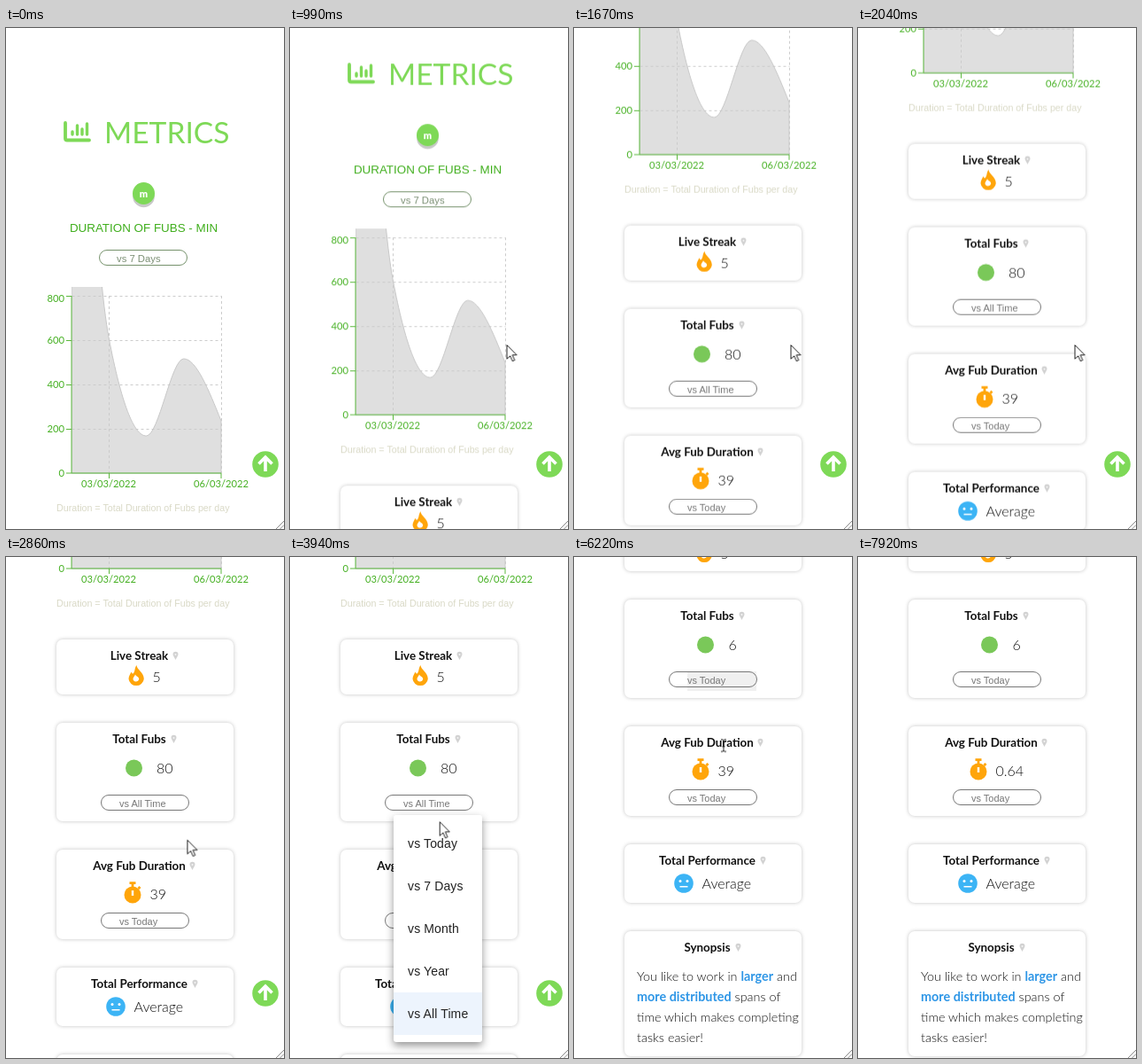
Recreate the animation shown at these times as an HTML page. Size 314 by 565 pixels, loop 8000 ms.

```html
<!DOCTYPE html>
<html lang="en">
<head>
<meta charset="utf-8">
<title>Metrics</title>
<style>
html, body { margin: 0; width: 100%; height: 100%; overflow: hidden; background: #fff; }
svg { display: block; width: 314px; height: 565px; }
text { font-family: Lato, sans-serif; font-weight: 300; fill: #111; white-space: pre; }
.title { font-size: 13.4px; font-weight: 700; text-anchor: middle; }
.value { font-size: 16px; }
.body { font-size: 14.4px; }
.link { font-weight: 700; fill: #2e96e6; }
.arial { font-family: "Liberation Sans", Arial, sans-serif; font-weight: 400; }
.pick { font-size: 11px; fill: #777; }
.option { font-size: 14px; letter-spacing: .13px; fill: #222; }
.axis text { font-size: 11.2px; font-weight: 400; fill: #45b022; }
.card { fill: #fff; filter: drop-shadow(0 0 2px rgba(0,0,0,.24)); }
.pill { fill: none; stroke: #777; }
.line { fill: none; stroke-linecap: round; stroke-linejoin: round; }
#menu { transform-origin: 167px 291px; }
#sheet { filter: drop-shadow(0 4px 5px rgba(0,0,0,.42)); }
</style>
</head>
<body>
<svg viewBox="0 0 314 565">
  <defs>
    <clipPath id="plot"><rect x="74" y="292" width="170" height="211"/></clipPath>
    <g id="pin">
      <path d="M0 4.5C-1 2-3-.2-3-1.7a3 3 0 0 1 6 0C3-.2 1 2 0 4.5Z" fill="#d2d2d2"/>
      <circle cy="-1.6" r="1" fill="#f4f4f4"/>
    </g>
    <g id="watch">
      <circle r="9.5" cy="1" fill="#ffa50a"/>
      <path d="M-3.5-12.3h7M0-12v4M6.5-8l2 2" stroke="#ffa50a" stroke-width="2.8" fill="none"/>
      <path d="M0-4v6" stroke="#fff" stroke-width="2.4"/>
    </g>
  </defs>

  <g id="page">
    <g stroke="#7ed957" stroke-width="3.8" class="line">
      <path d="M67 107v17.500q0 2 2 2h25"/>
      <path d="M75 117v3M80.500 110v10M86 114v6M91.500 108v12" stroke-width="3.4"/>
    </g>
    <text x="111" y="129.500" style="font-size:33.6px;font-weight:400;fill:#7ed957">METRICS</text>
    <circle cx="155.500" cy="189.800" r="12.400" fill="#c9c9c9"/>
    <circle cx="155.500" cy="186.500" r="12.500" fill="#7ed957"/>
    <text x="155.500" y="191" text-anchor="middle" style="font-size:11px;font-weight:900;fill:#fff">m</text>
    <text class="arial" x="155.500" y="230" text-anchor="middle" style="font-size:13.4px;fill:#3fae1c">DURATION OF FUBS - MIN</text>
    <rect class="pill" x="105.500" y="250.500" width="99" height="17" rx="8.500" style="stroke:#76926c"/>
    <text class="arial" x="125" y="264" style="font-size:11.3px;fill:#7b8f74">vs 7 Days</text>

    <path d="M74.500 302.500H243.500M74.500 352.500H243.500M74.500 402.500H243.500M74.500 452.500H243.500M116.500 302V502M243.500 302V502"
      stroke="#ccc" stroke-dasharray="3 3" fill="none"/>
    <path clip-path="url(#plot)" fill="#ccc" fill-opacity=".62" stroke="#c8c8c8"
      d="M74 502V-240C88.100 18 102.200 277 116.250 350C130.300 423 144.400 460 158.500 460C172.600 460 186.700 373 200.750 373C214.800 373 228.900 408 243 443V502Z"/>
    <g class="axis">
      <path d="M74 302V502H243M68 302.500h6M68 352.500h6M68 402.500h6M68 452.500h6M68 502h6M116.500 502v6M243 502v6" fill="none" stroke="#5bb83c"/>
      <g text-anchor="end">
        <text x="66" y="309">800</text><text x="66" y="356">600</text><text x="66" y="406">400</text>
        <text x="66" y="456">200</text><text x="66" y="506">0</text>
      </g>
      <g text-anchor="middle"><text x="116" y="518">03/03/2022</text><text x="243" y="518">06/03/2022</text></g>
    </g>
    <text class="arial" x="57" y="545" style="font-size:10.7px;fill:#d9d9c6">Duration = Total Duration of Fubs per day</text>

    <g id="cards"></g>

    <g transform="translate(147 623)">
      <path d="M.5-12C1-6.500 8.800-4 8.800 3.500A8.700 8.500 0 0 1-8.500 3.500C-8.500 0-6.500-2-5.500-4.500C-5-3-4.500-2.500-3.500-2.500C-1-4.500-2-9 .500-12Z" fill="#ffa50a"/>
      <path d="M-1-1.500C0 1 3.500 1 3.200 4A3.400 3.200 0 0 1-3.500 3.500C-3.500 1.500-1.500.500-1-1.500Z" fill="#fff"/>
    </g>
    <text class="value" x="165.500" y="630">5</text>

    <g id="mark"><circle cx="144.500" cy="727" r="9.500" fill="#7ac859"/></g>
    <text class="value" id="all" x="170" y="733">80</text>
    <text class="value" id="day" x="174.500" y="733">6</text>
    <rect id="focus" x="128" y="757" width="78" height="22" fill="#000" fill-opacity=".06"/>
    <rect class="pill" x="107.500" y="757.500" width="99" height="17" rx="8.500"/>
    <text class="arial pick" id="pickAll" x="128" y="771">vs All Time</text>
    <text class="arial pick" id="pickDay" x="128" y="771">vs Today</text>

    <g id="mins"><use href="#watch" x="143" y="869"/><text class="value" x="162.500" y="875">39</text></g>
    <g id="hours"><use href="#watch" x="136" y="869"/><text class="value" x="155.500" y="875">0.64</text></g>
    <rect class="pill" x="107.500" y="890.500" width="99" height="17" rx="8.500"/>
    <text class="arial pick" x="128" y="904">vs Today</text>

    <circle cx="124" cy="996" r="10.800" fill="#3cb4f5"/>
    <g fill="#fff"><circle cx="120" cy="993.500" r="1.500"/><circle cx="128" cy="993.500" r="1.500"/><rect x="119.500" y="999" width="9" height="1.500"/></g>
    <text class="value" x="144.500" y="1002">Average</text>

    <text class="body" x="71" y="1106">You like to work in <tspan class="link">larger</tspan> and</text>
    <text class="body" x="71" y="1129"><tspan class="link">more distributed</tspan> spans of</text>
    <text class="body" x="71" y="1152">time which makes completing</text>
    <text class="body" x="71" y="1175">tasks easier!</text>
  </g>

  <g id="menu">
    <rect id="sheet" x="117" y="291" width="100" height="256" rx="3" fill="#fff"/>
    <rect x="117" y="491" width="100" height="48" fill="#edf4fd"/>
    <rect id="hover" x="117" y="299" width="100" height="48" fill="#f5f5f5"/>
    <g id="options"></g>
  </g>

  <g id="up">
    <circle cx="293" cy="492" r="14.800" fill="#7ed957"/>
    <path d="M285.500 491.500l7.500-7.500 7.500 7.500M293 485v15" class="line" stroke="#fff" stroke-width="3.600" style="stroke-linecap:butt;stroke-linejoin:miter"/>
  </g>
  <path d="M305 565l9-9M309.500 565l4.500-4.500" stroke="#8a8a8a" fill="none"/>

  <g id="cursor">
    <path id="arrow" d="M.500.500V16.200L4.200 12.800L6.800 18.700L9.300 17.600L6.700 11.800H11.600Z" fill="#fff" stroke="#222"/>
    <path id="beam" d="M-3 .500h2.200L0 1.500L.800.500H3M0 1.500V13M-3 14h2.200L0 13L.800 14H3M-1.500 8.500h3" fill="none" stroke="#222"/>
  </g>
</svg>
<script>
const LOOP = 8000;
const $ = id => document.getElementById(id);

// title, card top, card height, title baseline, pin x
const cards = [
  ['Live Streak', 582, 62, 605, 191.5],
  ['Total Fubs', 676, 111, 699, 189.5],
  ['Avg Fub Duration', 819, 101, 842, 210.5],
  ['Total Performance', 952, 66, 975, 213.5],
  ['Synopsis', 1050, 141, 1073, 185.5]
];
$('cards').innerHTML = cards.map(([name, top, h, base, pin]) =>
  `<rect class="card" x="57" y="${top}" width="200" height="${h}" rx="7"/>
   <text class="title" x="150.5" y="${base}">${name}</text>
   <use href="#pin" x="${pin}" y="${base - 4.5}"/>`).join('');

$('options').innerHTML = ['Today', '7 Days', 'Month', 'Year', 'All Time'].map((name, i) =>
  `<text class="arial option" x="133" y="${328 + i * 48}">vs ${name}</text>`).join('');

// rows: [time, value, easing]; ends are held to fill the loop
function play(id, prop, rows, ease = 'linear') {
  const all = [[0, rows[0][1]], ...rows, [LOOP, rows[rows.length - 1][1]]];
  $(id).animate(
    all.map(([t, v, e]) => ({ offset: t / LOOP, [prop]: v, easing: e || ease })),
    { duration: LOOP, iterations: Infinity });
}
const shift = rows => rows.map(([t, x, y, e]) => [t, `translate(${x}px, ${y}px)`, e]);
const fade = (id, ...rows) => play(id, 'opacity', rows);

// hidden at first unless on is set; flips at each time
function toggle(id, on, ...times) {
  let v = on;
  const rows = [[0, v], ...times.map(t => [t, v = 1 - v])];
  play(id, 'opacity', rows, 'steps(1, end)');
}

play('page', 'transform', shift([
  [870, 0, 0, 'ease-in'], [960, 0, -45], [1290, 0, -266, 'ease-out'], [1370, 0, -293],
  [1550, 0, -293, 'ease-in-out'], [1750, 0, -391],
  [1930, 0, -391], [2040, 0, -451, 'ease-out'], [2230, 0, -489],
  [5360, 0, -489], [5390, 0, -508, 'ease-out'], [5710, 0, -628]
]));

play('cursor', 'transform', shift([
  [320, 274, 482], [365, 256, 405], [405, 244.5, 357],
  [2450, 244.5, 357, 'ease-in-out'], [3280, 163, 279],
  [3800, 163, 279], [3940, 168.5, 298, 'ease-out'], [4160, 186, 323],
  [4880, 186, 323], [4930, 206.5, 328],
  [5980, 206.5, 328, 'ease-in'], [6220, 169, 206, 'ease-out'], [6380, 163, 146],
  [6630, 163, 146, 'ease-in-out'], [7060, 170, 254, 'ease-in-out'], [7240, 166, 244]
]));
toggle('cursor', 0, 320, 7880);
toggle('arrow', 1, 6190, 6260);
toggle('beam', 0, 6190, 6260);

play('menu', 'transform', [
  [3430, 'scale(.75, .56)', 'ease-out'], [3660, 'scale(1, 1)'],
  [4600, 'scale(1, 1)', 'steps(1, end)'], [4700, 'scale(.75, .56)']
]);
fade('menu', [3410, 0], [3640, 1], [4290, 1], [4480, 0]);
toggle('hover', 0, 4000, 4600);

toggle('pickAll', 1, 4290);
toggle('pickDay', 0, 4290);
toggle('focus', 0, 4400, 7680);
toggle('all', 1, 4560);
toggle('day', 0, 4560);
play('mark', 'transform', shift([[0, 0, 0], [4560, 4, 0]]), 'steps(1, end)');

toggle('mins', 1, 7760);
toggle('hours', 0, 7760);
fade('up', [5400, 1], [5640, 0]);
</script>
</body>
</html>
```
